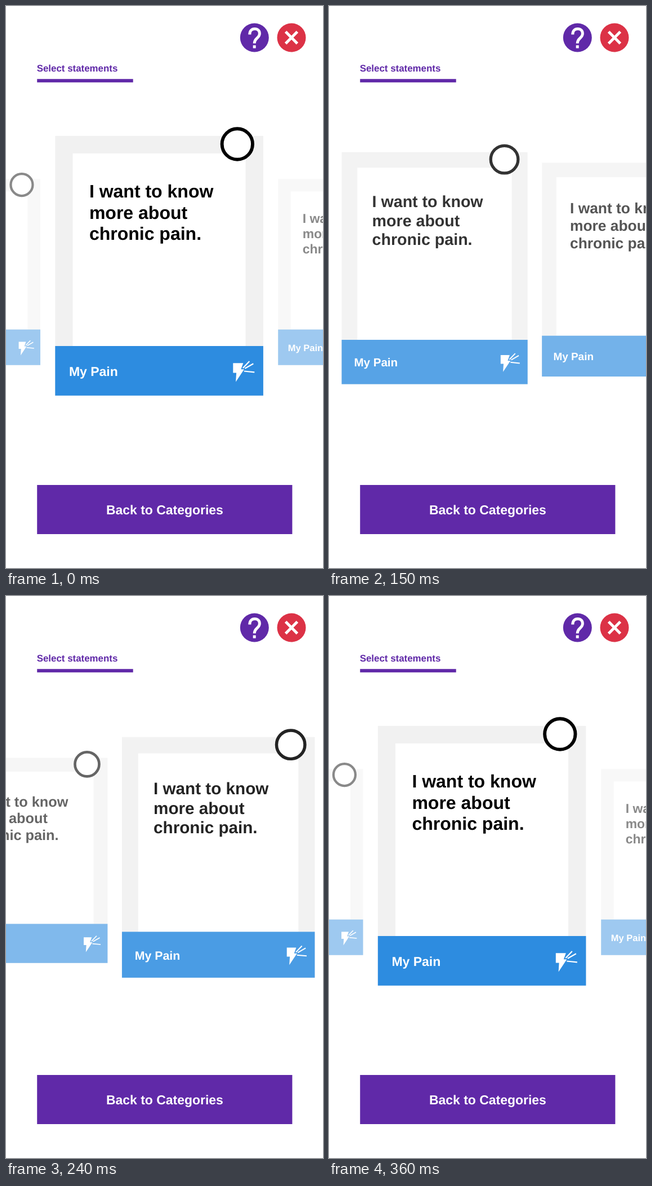
Write an HTML page that moves like this. It is 563 by 995 pixels and loops after 0.9 s.

```html
<!DOCTYPE html>
<html lang="en">
<head>
<meta charset="utf-8">
<title>Statement cards</title>
<style>
  html, body { margin: 0; width: 100%; height: 100%; overflow: hidden; background: #fff; }
  svg { display: block; }
  text { font-family: "Liberation Sans", Arial, sans-serif; font-weight: bold; text-rendering: geometricPrecision; }
</style>
</head>
<body>
<svg width="563" height="995" viewBox="0 0 563 995">
  <defs>
    <g id="card">
      <path fill="#f1f1f1" d="M0 230h369.6v460H0z"/>
      <path fill="#fff" d="M31.2 261h307v341h-307z"/>
      <path fill="#2d8ce0" d="M0 602h369.6v87.8H0z"/>
      <circle cx="323.5" cy="244.5" r="27.2" fill="#fff" stroke="#000" stroke-width="5.9"/>
      <g font-size="32">
        <text x="60.6" y="339.3">I want to know</text>
        <text x="60.6" y="376.7">more about</text>
        <text x="60.6" y="414.1">chronic pain.</text>
      </g>
      <text x="24.6" y="655" font-size="23" fill="#fff">My Pain</text>
      <path fill="#fff" d="M316 632.3h18l-4 11h5.6l-14.8 22.2 1-16H316z"/>
      <path fill="none" stroke="#fff" stroke-width="2.2" d="M333.5 641l11.5-12M337 641.8l15-8.6M335.5 646.5l18.5 1.8"/>
    </g>
  </defs>

  <g id="deck">
    <use href="#card"/><use href="#card"/><use href="#card"/><use href="#card"/>
  </g>

  <g fill="#6029a8">
    <circle cx="441.3" cy="56" r="25.5"/>
    <text x="54.7" y="116.3" font-size="16.9">Select statements</text>
    <path d="M55.2 129.2h170.5v6H55.2zM55.2 847.9h453.2v87.1H55.2z"/>
  </g>
  <circle cx="507" cy="56" r="25.5" fill="#dc3246"/>
  <g fill="none" stroke="#fff" stroke-width="5">
    <path d="M432.8 50.4c0-6.2 3.4-9.8 8.9-9.8 5.4 0 8.7 3.4 8.7 8.2 0 4-2.1 6-4.7 8.4-3 2.7-4.5 4.6-4.5 9M441.2 69.6v5.2"/>
    <path d="M496.6 45.6l20.8 20.8M517.4 45.6l-20.8 20.8"/>
  </g>
  <text x="178" y="899.9" font-size="22.95" fill="#fff">Back to Categories</text>
</svg>

<script>
const LOOP = 900, STEP = 30, STEPS = 12;
const WIDTH = 369.6, PIVOT_Y = 499, SMALL = 0.717, FAINT = 0.46;
// Share of the slide covered after each step; it peaks later than the scaling does.
const SLIDE = [0, .0085, .038, .0875, .1625, .265, .397, .5455, .6995, .832, .929, .982, 1];
const [previous, current, next, upcoming] = document.getElementById("deck").children;

const mix = (a, b, k) => a + (b - a) * k;

// focus: 0 = small and faint at the side, 1 = full size in the middle
function place(card, focus, edge, fromRight) {
  const scale = mix(SMALL, 1, focus);
  const x = fromRight ? edge - WIDTH * scale : edge;
  card.setAttribute("transform", `translate(${x} ${PIVOT_Y * (1 - scale)}) scale(${scale})`);
  card.setAttribute("opacity", mix(FAINT, 1, focus));
}

function draw(now) {
  const step = Math.min(STEPS, Math.floor((now % LOOP) / STEP));
  const t = step / STEPS;
  const focus = t * t * (3 - 2 * t);
  const slide = SLIDE[step];
  const nextLeft = mix(483.2, 86.8, slide);
  const gap = 26.3 - 0.9 * Math.sin(Math.PI * t);

  place(previous, 0, mix(61, -230, slide), true);
  place(current, 1 - focus, nextLeft - gap, true);
  place(next, focus, nextLeft);
  place(upcoming, 0, nextLeft + 396.4);
}

const start = performance.now();
function tick() {
  draw(performance.now() - start);
  requestAnimationFrame(tick);
}
tick();
</script>
</body>
</html>
```
